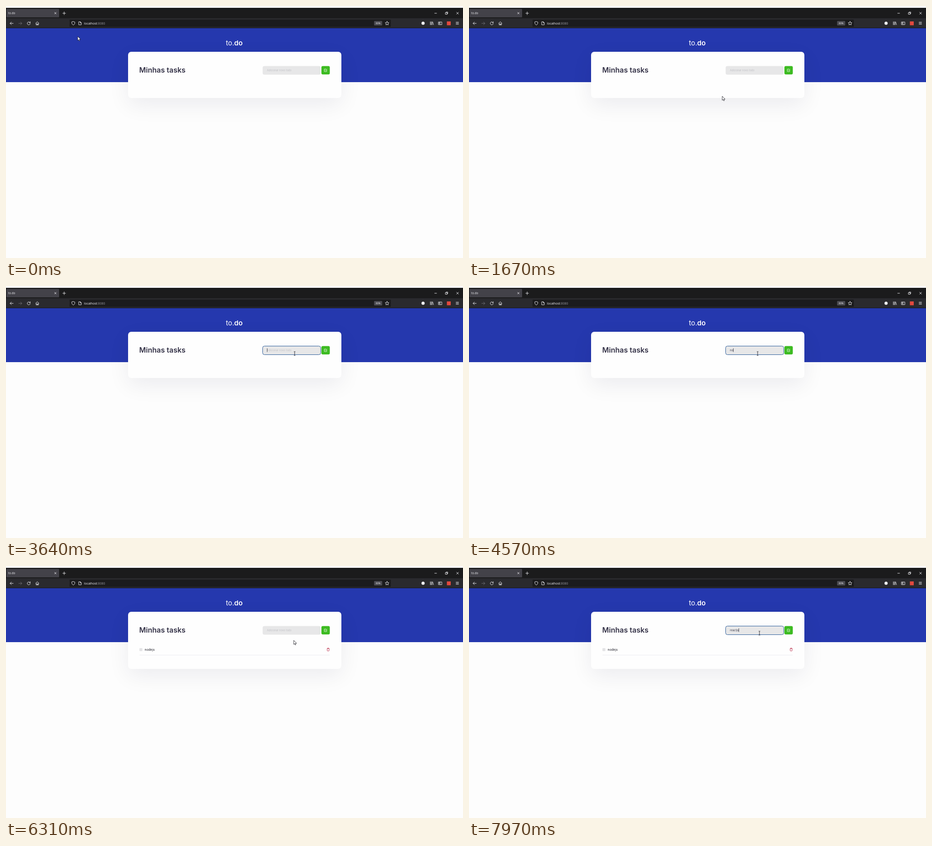
An HTML page that plays this animation: 1007 px wide and 556 px high, repeating every 8 s.

```html
<!DOCTYPE html>
<html lang="pt">
<head>
<meta charset="utf-8">
<title>to.do</title>
<style>
  html, body { margin: 0; width: 100%; height: 100%; overflow: hidden; background: #fdfdfd; }
  #stage { position: relative; width: 1007px; height: 556px; overflow: hidden; }
  #stage > * { position: absolute; }
  .banner { left: 0; top: 49px; width: 100%; height: 119px; background: #2538ae; }
  #card {
    left: 268.5px; top: 101px; width: 470px; height: 102px; border-radius: 7px;
    background: #fefefe; box-shadow: 0 15px 48px rgba(20, 20, 60, .07);
  }
  #card.filled { height: 126px; }
  svg { left: 0; top: 0; }
  text { font-family: Inter, "Open Sans", sans-serif; }
  .ui text { font-family: "Open Sans", "Noto Sans", sans-serif; fill: #f4f4f8; }
  .line { fill: none; stroke: #f4f4f8; stroke-width: .9; stroke-linecap: round; stroke-linejoin: round; }
  .dim { stroke: #73737a; }
  #field { fill: #e7e7e8; }
  #field.focus { stroke: #285a98; stroke-width: 1; }
  #typed { font-size: 6px; fill: #3d3d4d; }
  #typed.hint { font-size: 5.7px; fill: #c1c1c6; }
</style>
</head>
<body>
<div id="stage">
  <div class="banner"></div>
  <div id="card"></div>
  <svg width="1007" height="556" viewBox="0 0 1007 556">
    <g class="ui">
      <rect y="4" width="1007" height="23" fill="#1b1b1c"/>
      <rect y="27" width="1007" height="22" fill="#2a2a2e"/>
      <rect y="48.2" width="1007" height=".8" fill="#121218"/>
      <rect x="1" y="6.5" width="116" height="18.5" rx="1.5" fill="#434249"/>
      <rect x="140" y="30" width="708" height="16" rx="1.5" fill="#1b1b1d"/>
      <rect x="811" y="33" width="18" height="10" rx="1.5" fill="#4a4a50"/>
      <text x="5" y="18.2" font-size="6.3">to.do</text>
      <text x="172" y="40.8" font-size="6.9">localhost<tspan fill="#96969c">:8080</tspan></text>
      <text x="820" y="40.2" font-size="5.4" text-anchor="middle">80%</text>

      <g class="line">
        <path d="M107 14l3.6 3.6M110.600 14l-3.600 3.600M125 16h6.400M128.200 12.800v6.400"/>
        <path d="M944.500 16h4.500M968.500 14.700h3.600v3.600h-3.600zM969.700 14.500v-1.200h3.700v3.700h-1.200M992.800 13.700l4.400 4.400M997.200 13.700l-4.400 4.400"/>
        <path d="M16 38.300H9M12 35.300l-3 3 3 3"/>
        <path class="dim" d="M28 38.300h7M32 35.300l3 3-3 3"/>
        <path d="M53 36.500a3.300 3.300 0 1 0 .5 2.300M53.500 34.700v2.300h-2.300"/>
        <path d="M65.500 38l3.500-3.300 3.500 3.300M66.300 37.700v4h5.400v-4M68.300 41.500v-2.300h1.500v2.300"/>
        <path d="M148.300 34.300l3.400 1.200c.2 3.300-.8 5.200-3.400 6.500-2.600-1.300-3.600-3.200-3.400-6.500z"/>
        <path d="M160.600 34.800h3.200l2.100 2.100v4.700h-5.300zM163.600 35v2.200h2.200"/>
        <path d="M839.700 34l1.200 2.600 2.900.4-2.100 2 .5 2.900-2.500-1.400-2.500 1.400.5-2.900-2.100-2 2.900-.4z"/>
        <path d="M935 34.800v6.700M937 34.800v6.700M939 34.800v6.700M940.200 35.200l1.800 6.200"/>
        <path d="M953.200 35.300h7.200v5.800h-7.200zM956.200 35.300v5.800M954.200 37h1M954.200 38.500h1"/>
        <path d="M991.700 35.700h5.600M991.700 38h5.600M991.700 40.300h5.600"/>
      </g>
      <circle cx="919" cy="38" r="3.500" fill="#f4f4f8"/>
      <rect x="971.500" y="34" width="8.500" height="8.500" fill="#e2493f"/>
    </g>

    <text x="484.500" y="87.300" font-size="15.200" fill="#fff">to.<tspan font-weight="600">do</tspan></text>
    <text x="293.500" y="147.200" font-size="16" font-weight="600" fill="#343247">Minhas tasks</text>

    <rect id="field" x="565.500" y="132.500" width="128" height="19" rx="4"/>
    <text id="typed" x="575" y="143.600"></text>
    <rect id="caret" y="137.500" width=".8" height="8" fill="#22222c"/>
    <rect x="695" y="132.500" width="18.500" height="18.500" rx="3" fill="#3dbb22"/>
    <path d="M706.700 141.500v2.500q0 .7-.7.700h-4q-.7 0-.7-.7v-4.300q0-.7.7-.7h3M702.900 141.300l1.300 1.300 3-3.400"
      fill="none" stroke="#fff" stroke-width=".8" stroke-linecap="round"/>

    <g id="task">
      <rect x="294" y="181.300" width="6.500" height="6.500" rx="1" fill="#e4e4e6"/>
      <text x="305.500" y="187" font-size="7" fill="#1c1c26">nodejs</text>
      <path d="M707.200 182.300h5.400M708.600 182.100v-1h2.600v1M707.800 182.500v4.300q0 .6.600.6h3q.6 0 .6-.6v-4.300"
        fill="none" stroke="#bd3350" stroke-width=".9"/>
      <path d="M294 196.500h419.500" stroke="#ececf0"/>
    </g>

    <path id="arrow" d="M0 0v9l2-1.800 1.300 3 1.500-.7-1.300-2.900h2.800z" fill="#fff" stroke="#15151c" stroke-width=".8"/>
    <path id="beam" d="M-1.700-4.200h1.300l.4.400.4-.4h1.300M0-3.800v7.800M-1.700 4.400h1.300l.4-.4.4.4h1.300"
      fill="none" stroke="#1c1c24" stroke-width=".9"/>
  </svg>
</div>
<script>
  const LOOP = 8000;
  const $ = id => document.getElementById(id);
  const [card, field, typed, caret, task, arrow, beam] =
    ["card", "field", "typed", "caret", "task", "arrow", "beam"].map($);

  // Pointer stops: time, x, y
  const stops = [
    [0, 158, 67], [40, 158, 67], [570, 717, 164], [900, 717, 164],
    [1500, 558, 199], [1850, 558, 199], [2480, 636, 149], [5050, 636, 149],
    [5300, 690, 159], [5540, 717, 131], [5650, 717, 131], [5860, 704, 140],
    [5960, 704, 140], [6280, 634, 164], [6480, 634, 164], [6760, 640, 148], [LOOP, 640, 148]
  ];

  // Each entry: focus time, first key, key interval, submit time, word
  const entries = [
    { focus: 2600, start: 4300, gap: 170, end: 5920, word: "nodejs" },
    { focus: 6850, start: 7150, gap: 110, end: LOOP, word: "reactjs" }
  ];
  const ADDED = entries[0].end;

  const ease = u => u * u * (3 - 2 * u);
  const show = (el, on) => el.style.display = on ? "" : "none";

  function pointerAt(t) {
    const i = stops.findIndex(s => s[0] > t);
    const [t0, x0, y0] = stops[i - 1], [t1, x1, y1] = stops[i];
    const u = ease((t - t0) / (t1 - t0));
    return [x0 + (x1 - x0) * u, y0 + (y1 - y0) * u];
  }

  function drawField(t) {
    const e = entries.find(e => t >= e.focus && t < e.end);
    const count = e ? Math.max(0, Math.min(e.word.length, Math.floor((t - e.start) / e.gap) + 1)) : 0;
    const text = count ? e.word.slice(0, count) : "Adicionar novo todo";
    if (typed.textContent !== text) typed.textContent = text;
    typed.classList.toggle("hint", !count);
    field.classList.toggle("focus", !!e);
    show(caret, e && (count || (t - e.focus) % 1000 < 500));
    caret.setAttribute("x", 575 + (count ? typed.getComputedTextLength() : 0));
  }

  function drawPointer(t) {
    const [x, y] = pointerAt(t);
    const inField = x > 565 && x < 693 && y > 132 && y < 152;
    show(beam, inField);
    show(arrow, !inField);
    (inField ? beam : arrow).setAttribute("transform", `translate(${x} ${y})`);
  }

  function draw() {
    const t = performance.now() % LOOP;
    card.classList.toggle("filled", t >= ADDED);
    show(task, t >= ADDED);
    drawField(t);
    drawPointer(t);
    requestAnimationFrame(draw);
  }
  draw();
</script>
</body>
</html>
```
